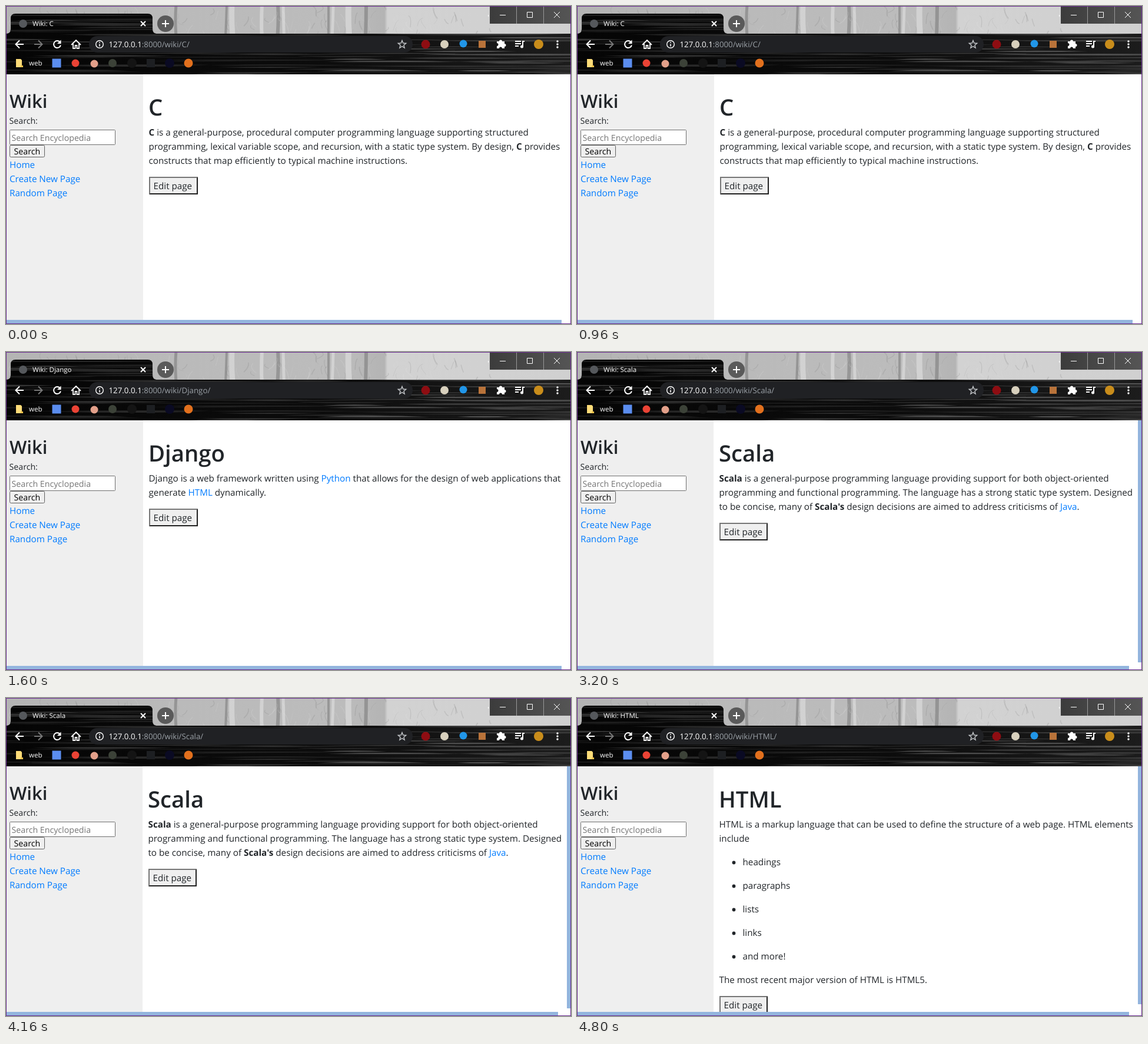
These frames come from a looping animation (960x540 px, 6.4 s). An HTML page:

```html
<!DOCTYPE html>
<html lang="en">
<head>
<meta charset="utf-8">
<title>Wiki</title>
<style>
html, body { margin: 0; width: 100%; height: 100%; overflow: hidden; background: #fff; }
svg { display: block; width: 960px; height: 540px; }
text { font: 15.22px "Open Sans", "Noto Sans", sans-serif; fill: #212529; text-rendering: geometricPrecision; }
.h1 { font-size: 38.3px; font-weight: 600; }
.h2 { font-size: 31px; font-weight: 600; }
.form { font-size: 14.2px; }
.link { fill: #007bff; }
.bold { font-weight: 700; }
.tab { font-size: 11.5px; font-weight: 500; fill: #fff; }
.url { font-size: 13.3px; fill: #9aa0a6; }
.url .host { fill: #fff; }
.line { fill: none; stroke: #fff; stroke-width: 2; }
.thin { fill: none; stroke: #fff; stroke-width: 1; }
.page { visibility: hidden; animation: show 6400ms step-end infinite; }
@keyframes show {
  0% { visibility: visible; }
  25%, 100% { visibility: hidden; }
}
</style>
</head>
<body>
<svg viewBox="0 0 960 540">
  <defs>
    <linearGradient id="fog">
      <stop offset="0" stop-color="#b4b4b4"/>
      <stop offset=".3" stop-color="#bababa"/>
      <stop offset=".6" stop-color="#bcbcbc"/>
      <stop offset=".67" stop-color="#b4b4b4"/>
      <stop offset=".675" stop-color="#d2d2d2"/>
      <stop offset="1" stop-color="#d0d0d0"/>
    </linearGradient>
    <linearGradient id="wood">
      <stop offset="0" stop-color="#050505"/>
      <stop offset=".55" stop-color="#0c0c0c"/>
      <stop offset="1" stop-color="#1c1c1c"/>
    </linearGradient>
    <linearGradient id="controls">
      <stop offset="0" stop-color="#3c3c3c"/>
      <stop offset="1" stop-color="#555"/>
    </linearGradient>
    <clipPath id="strip"><rect width="960" height="47"/></clipPath>
    <clipPath id="frame"><path id="dark" d="M0 116V47q8 0 8-8V21q0-8 8-8h225q8 0 8 8v18q0 8 8 8h703v69z"/></clipPath>
  </defs>

  <!-- tab strip -->
  <rect width="960" height="47" fill="url(#fog)"/>
  <g id="forest" clip-path="url(#strip)" fill="none"></g>
  <rect x="819" y="15" width="1" height="3" fill="#fff"/>
  <rect x="822" width="138" height="30" fill="url(#controls)"/>
  <path d="M867.5 0v30M913.5 0v30" stroke="#999"/>
  <path class="thin" d="M839 15.5h10M885.5 10.5h9v9h-9zM931 10l10 10M941 10l-10 10"/>

  <!-- dark theme of tab and toolbar -->
  <use href="#dark" fill="url(#wood)"/>
  <g id="grain" clip-path="url(#frame)"></g>
  <circle cx="29" cy="30" r="7" fill="#55585c"/>
  <path d="M229 26l8 8M237 26l-8 8" class="line"/>
  <circle cx="271" cy="30" r="14" fill="#5a5a5a"/>
  <path d="M265 30h12M271 24v12" class="line"/>

  <!-- toolbar -->
  <path d="M30 65H17M23 58.5l-6.5 6.5 6.5 6.5" class="line"/>
  <path d="M48 65h13M55 58.5l6.5 6.5-6.5 6.5" class="line" style="stroke:#777"/>
  <path d="M91.5 61a6 6 0 1 0 1.4 5.5" class="line"/>
  <path d="M93.5 57.5v6.5h-6.5z" fill="#fff"/>
  <path d="M111 66l8-8 8 8M114 64v8h3.5v-5h3v5h3.5v-8" class="line" style="stroke-width:1.8"/>
  <rect x="141" y="51" width="550" height="28" rx="14" fill="#202124"/>
  <circle cx="159" cy="65" r="6.3" class="line" style="stroke-width:1.4"/>
  <path d="M159 64.5v4M159 61v1.7" class="line" style="stroke-width:1.6"/>
  <path id="star" fill="none" stroke="#c4c7ca" stroke-width="1.4"/>
  <path d="M834 60h4a2.5 2.5 0 1 1 5 0h4v4a2.5 2.5 0 1 1 0 5v3h-4a2.4 2.4 0 0 0-5 0h-4v-4a2.5 2.5 0 0 0 0-5z" fill="#fff"/>
  <path d="M865 60h10M865 64h10M865 68h6M878 70v-10h3" class="line"/>
  <circle cx="876.5" cy="69" r="2.5" fill="#fff"/>
  <g fill="#fff">
    <circle cx="937" cy="60" r="1.7"/><circle cx="937" cy="65" r="1.7"/><circle cx="937" cy="70" r="1.7"/>
  </g>
  <g id="badges"></g>

  <!-- bookmarks -->
  <path d="M17 90h8l2 2v12H17z" fill="#fddc78"/>
  <path d="M25 101h4v3h-4z" fill="#f2c24b"/>
  <text x="39" y="101" class="tab">web</text>

  <!-- sidebar -->
  <rect y="116" width="233" height="424" fill="#efefef"/>
  <text x="6" y="173" class="h2">Wiki</text>
  <text x="5.5" y="200" class="form">Search:</text>
  <rect x="6.5" y="210.5" width="179" height="25" rx="1" fill="#fff" stroke="#6e6e6e"/>
  <text x="9.5" y="229" class="form" style="fill:#757575">Search Encyclopedia</text>
  <rect x="6.5" y="236.5" width="59" height="20" rx="2" fill="#efefef" stroke="#606060"/>
  <text x="13.5" y="252" class="form" style="fill:#000">Search</text>
  <text x="6" y="275" class="link">Home</text>
  <text x="6" y="299" class="link">Create New Page</text>
  <text x="6" y="323" class="link">Random Page</text>

  <g id="pages"></g>
  <rect x=".5" y=".5" width="959" height="539" fill="none" stroke="#6a2c91"/>
</svg>

<script>
const $ = id => document.getElementById(id);

let seed = 11;
const rand = (a, b) => {
  seed = (seed * 16807) % 2147483647;
  return a + (b - a) * seed / 2147483647;
};
const grey = (v, a) => `rgba(${v},${v},${v},${a})`;
const stroke = (d, color, w) => `<path d="${d}" stroke="${color}" stroke-width="${w}"/>`;

// foggy wood: trunks and gaps of light, then faint twigs
function forest() {
  let s = '';
  const trunk = (x, w, color) => stroke(`M${x} -2q${rand(-2, 2)} 24 ${rand(-2, 2)} 50`, color, w);
  for (const [x, w] of [[289, 5], [375, 4], [462, 6], [548, 4], [612, 6]]) s += trunk(x, w, grey(95, .4));
  for (const [x, w] of [[384, 9], [435, 6], [471, 5], [556, 5], [582, 10]]) s += trunk(x, w, grey(225, .6));
  for (let i = 0; i < 110; i++) {
    const x = rand(0, 822), y = rand(0, 47);
    s += stroke(`M${x} ${y}q${rand(-8, 8)} ${rand(2, 8)} ${rand(-10, 10)} ${rand(6, 20)}`,
      grey(i % 3 ? 100 : 235, .16), rand(.5, 1.8));
  }
  return s;
}

// long tapered streaks, brighter to the right
function grain() {
  let s = '';
  for (let i = 0; i < 130; i++) {
    const x = rand(-120, 900), y = rand(14, 116), len = rand(90, 380), h = rand(.8, 3);
    const v = Math.round(rand(30, 62) + (x > 520 ? 30 : 0)), bend = rand(-2, 2);
    s += `<path d="M${x} ${y}q${len / 2} ${bend - h} ${len} 0q${-len / 2} ${bend + h} ${-len} 0z" fill="${grey(v, .85)}"/>`;
  }
  return s;
}

function badges() {
  const dot = (x, y, r, c) => `<circle cx="${x}" cy="${y}" r="${r}" fill="${c}"/>`;
  const box = (x, y, r, c) => `<rect x="${x - r}" y="${y - r}" width="${2 * r}" height="${2 * r}" fill="${c}"/>`;
  return dot(713, 65, 7.5, '#8e0d12') + dot(745, 65, 7, '#d8d0bd') + dot(777, 64, 6.5, '#2196e8') +
    box(809, 65, 6, '#b9733a') + dot(905, 65, 8, '#c98d1b') +
    box(86, 97, 7.5, '#5b8def') + dot(118, 97, 6.5, '#ea4335') + dot(150, 98, 6.5, '#e3a08a') +
    dot(181, 97, 7, '#3c4238') + dot(214, 97, 8, '#141414') + box(246, 97, 7, '#1d1f22') +
    dot(278, 97, 8, '#0a0a23') + dot(310, 97, 7.5, '#e2701d');
}

function star(cx, cy) {
  let d = '';
  for (let i = 0; i < 10; i++) {
    const a = i * Math.PI / 5 - Math.PI / 2, r = i % 2 ? 3 : 7;
    d += (i ? 'L' : 'M') + (cx + r * Math.cos(a)) + ' ' + (cy + r * Math.sin(a));
  }
  return d + 'z';
}

// *word* is bold, [word] is a link
const rich = t => t
  .replace(/\*(.+?)\*/g, '<tspan class="bold">$1</tspan>')
  .replace(/\[(.+?)\]/g, '<tspan class="link">$1</tspan>');
const text = (x, y, t, c = '') => `<text x="${x}" y="${y}" class="${c}">${rich(t)}</text>`;
const rect = (x, y, w, h, c) => `<rect x="${x}" y="${y}" width="${w}" height="${h}" fill="${c}"/>`;

function button(x, y, w) {
  return rect(x, y, w, 30, '#efefef') +
    `<path d="M${x} ${y}h${w}l-2 2h${4 - w}v26l-2 2z" fill="#767676"/>` +
    `<path d="M${x + w} ${y}v30h${-w}l2 -2h${w - 4}v-26z" fill="#212121"/>` +
    text(x + 7.5, y + 21, 'Edit page');
}

const pages = [
  { title: 'C', x: 243, edit: 290, lines: [
    '*C* is a general-purpose, procedural computer programming language supporting structured',
    'programming, lexical variable scope, and recursion, with a static type system. By design, *C* provides',
    'constructs that map efficiently to typical machine instructions.'] },
  { title: 'Django', x: 243, edit: 266, lines: [
    'Django is a web framework written using [Python] that allows for the design of web applications that',
    'generate [HTML] dynamically.'] },
  { title: 'Scala', x: 242, edit: 290, side: 527, lines: [
    '*Scala* is a general-purpose programming language providing support for both object-oriented',
    'programming and functional programming. The language has a strong static type system. Designed',
    "to be concise, many of *Scala's* design decisions are aimed to address criticisms of [Java]."] },
  { title: 'HTML', x: 242, edit: 506, side: 520, lines: [
    'HTML is a markup language that can be used to define the structure of a web page. HTML elements',
    'include'],
    list: ['headings', 'paragraphs', 'lists', 'links', 'and more!'],
    end: 'The most recent major version of HTML is HTML5.' }
];

function page(p, i) {
  const { title, x, side } = p, bar = '#93b5de';
  let s = rect(x - 10, 116, 970 - x, 424, '#fff');
  s += text(45, 34, 'Wiki: ' + title, 'tab');
  s += `<text x="174.5" y="70" class="url"><tspan class="host">127.0.0.1</tspan>:8000/wiki/${title}/</text>`;
  s += text(x - 1, 186, title, 'h1');
  p.lines.forEach((t, k) => s += text(x - .5, 220 + 24 * k, t));
  (p.list || []).forEach((t, k) => {
    s += `<circle cx="266.5" cy="${279.5 + 40 * k}" r="2.9" fill="#212529"/>` + text(281.5, 284 + 40 * k, t);
  });
  if (p.end) s += text(x - .5, 484, p.end);
  s += button(x, p.edit, side ? 82 : 83);
  if (side) s += rect(953, 116, 7, side - 116, bar);
  s += rect(0, 533, side ? 938 : 944, 7, bar);
  return `<g class="page" style="animation-delay:${i ? 1600 * i - 6400 : 0}ms">${s}</g>`;
}

$('forest').innerHTML = forest();
$('grain').innerHTML = grain();
$('badges').innerHTML = badges();
$('star').setAttribute('d', star(673, 65.5));
$('pages').innerHTML = pages.map(page).join('');
</script>
</body>
</html>
```
